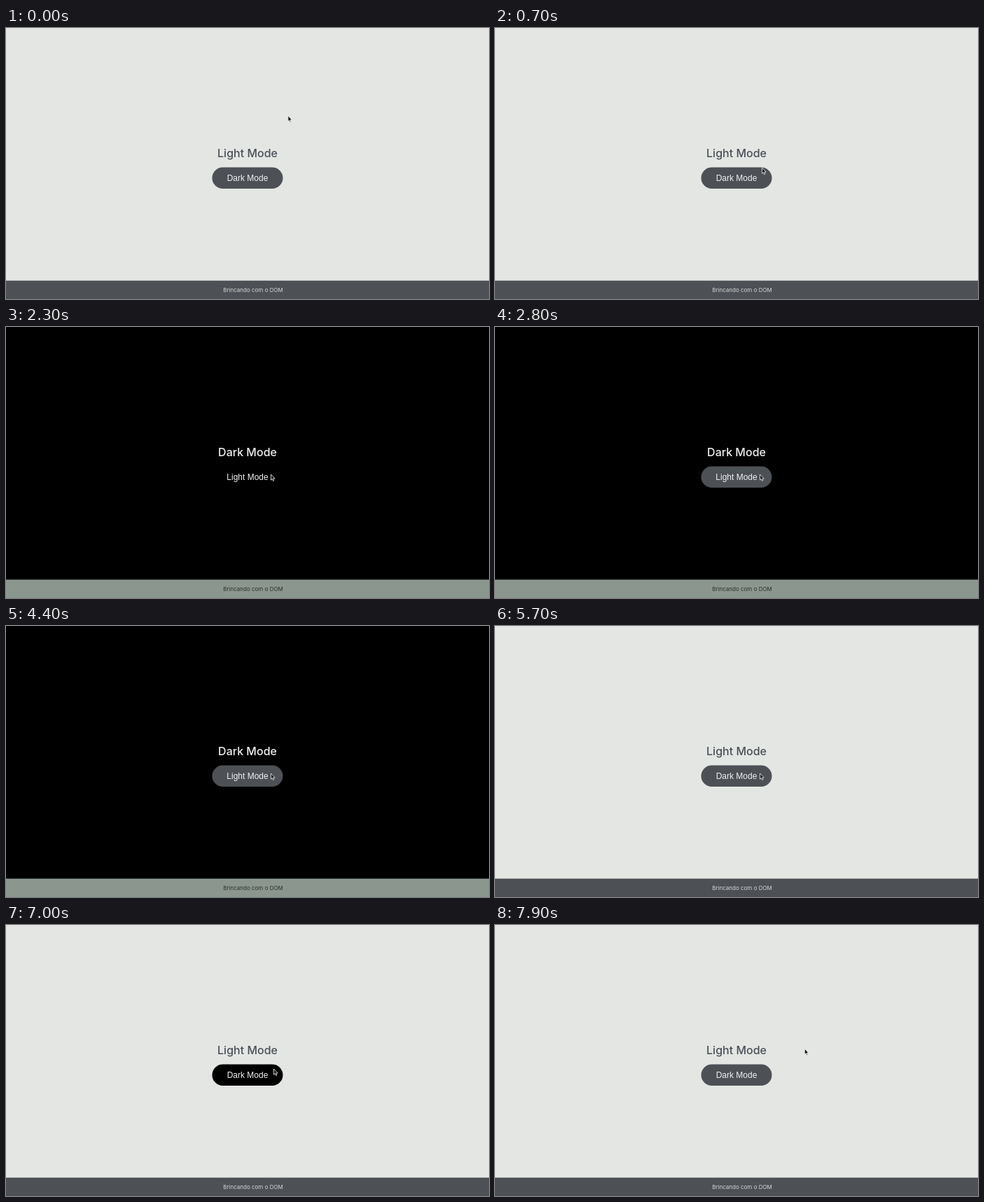
An HTML page for the animation above (8 s loop, 690 by 388 pixels).

```html
<!DOCTYPE html>
<html lang="pt">
<head>
<meta charset="utf-8">
<title>Light / Dark</title>
<style>
  html, body { margin: 0; width: 100%; height: 100%; overflow: hidden; background: #e3e6e2; }
  svg { display: block; width: 100vw; height: 100vh; }
  text { text-anchor: middle; }
  #title { font: 500 16px Inter, sans-serif; }
  #label { font: 12px "Liberation Sans", Arial, sans-serif; fill: #f0f1f0; }
  #note { font: 8px Inter, sans-serif; }
</style>
</head>
<body>
<svg viewBox="0 0 690 388">
  <rect id="page" width="690" height="388"/>
  <text id="title" x="345" y="185"></text>
  <rect id="button" x="294.5" y="199.5" width="101" height="30.5" rx="15.25"/>
  <text id="label" x="345" y="219"></text>
  <rect id="footer" y="361.7" width="690" height="26.3"/>
  <text id="note" x="353" y="378">Brincando com o DOM</text>
  <path id="cursor" d="M.5 .8V9L2.3 7.4 3.6 10.3 4.9 9.7 3.6 6.9H6.2Z"
        fill="#141516" stroke="#f4f5f4" stroke-width=".8"/>
</svg>
<script>
  const LOOP = 8000, STEP = 100;
  const $ = id => document.getElementById(id);
  const [page, title, button, label, footer, note, cursor] =
    ['page', 'title', 'button', 'label', 'footer', 'note', 'cursor'].map($);

  const themes = {
    light: { title: 'Light Mode', label: 'Dark Mode', page: '#e3e6e2', ink: '#4a4f59', footer: '#4d5155', note: '#d5d8d6' },
    dark: { title: 'Dark Mode', label: 'Light Mode', page: '#000', ink: '#f0f1f0', footer: '#8b968f', note: '#2b302e' }
  };
  const GREY = [77, 81, 86], BLACK = [0, 0, 0];

  // Button fades: start, end, from, to
  const fades = [
    [700, 1200, GREY, BLACK],
    [2300, 2800, BLACK, GREY],
    [5750, 6250, GREY, BLACK],
    [7200, 7750, BLACK, GREY]
  ];
  // Cursor stops: time, x, y
  const stops = [
    [0, 402.4, 124.8], [900, 378, 210.2], [6900, 378, 210.2],
    [7000, 382, 205.2], [7800, 437, 178.2], [7900, 441.8, 176.3]
  ];

  const clamp = v => Math.min(1, Math.max(0, v));
  const mix = (a, b, k) => a + (b - a) * k;
  const smooth = k => k * k * (3 - 2 * k);
  const ease = k => smooth(Math.pow(k, .7));

  function buttonColor(t) {
    const [start, end, from, to] = fades.filter(f => t >= f[0]).pop() || fades[0];
    const k = ease(clamp((t - start) / (end - start)));
    return `rgb(${from.map((c, i) => Math.round(mix(c, to[i], k)))})`;
  }

  function cursorAt(t) {
    const i = Math.max(0, stops.findLastIndex(s => t >= s[0]));
    const a = stops[i], b = stops[i + 1] || a;
    let k = b === a ? 0 : (t - a[0]) / (b[0] - a[0]);
    if (i === 0) k = smooth(k);
    return [mix(a[1], b[1], k), mix(a[2], b[2], k)];
  }

  function draw(t) {
    const theme = themes[t >= 2300 && t < 5700 ? 'dark' : 'light'];
    page.style.fill = theme.page;
    title.textContent = theme.title;
    title.style.fill = theme.ink;
    label.textContent = theme.label;
    button.style.fill = buttonColor(t);
    footer.style.fill = theme.footer;
    note.style.fill = theme.note;
    cursor.setAttribute('transform', `translate(${cursorAt(t)})`);
  }

  const began = performance.now();
  function tick() {
    const t = (performance.now() - began) % LOOP;
    draw(Math.floor(t / STEP) * STEP);
    requestAnimationFrame(tick);
  }
  tick();
</script>
</body>
</html>
```
